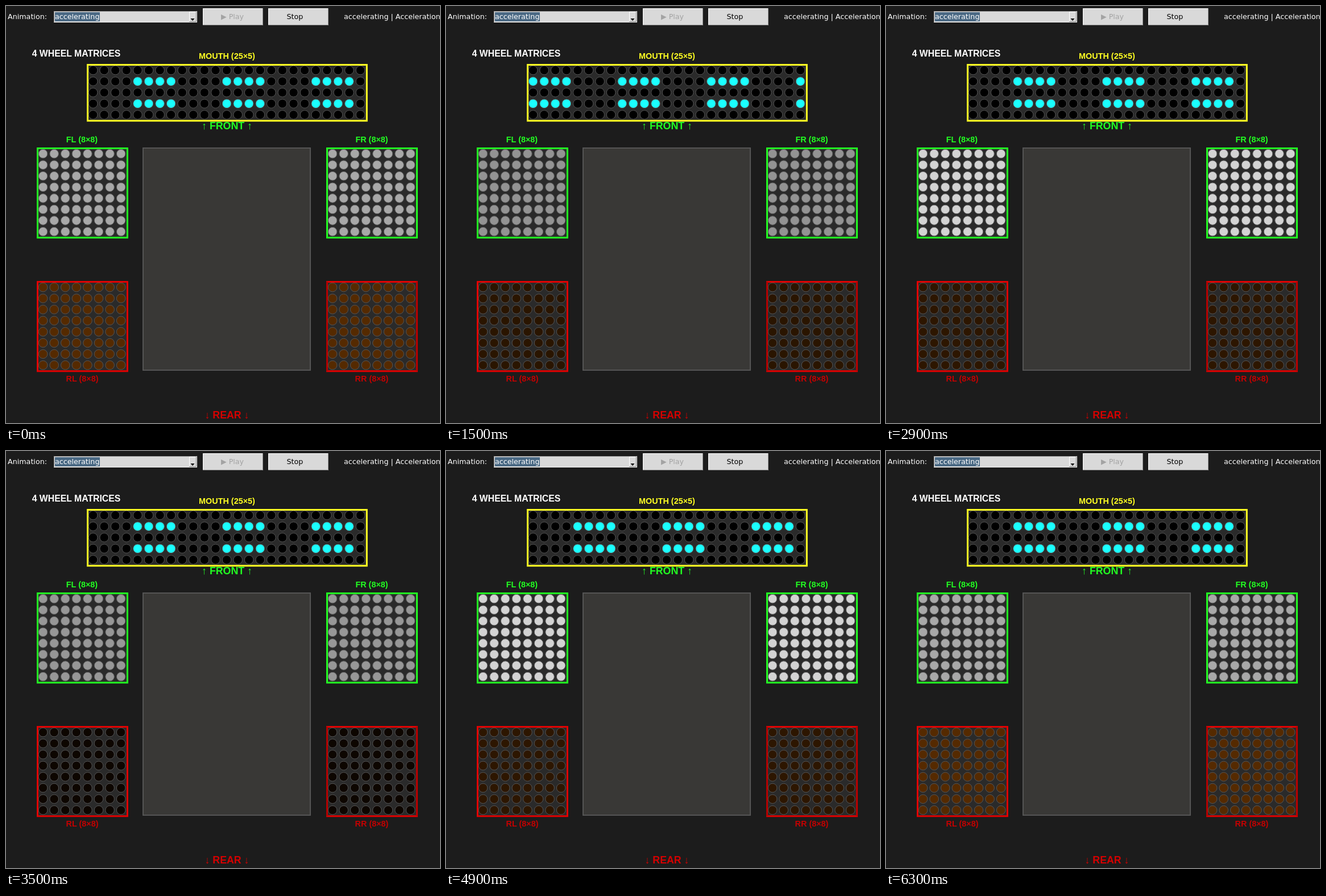
These frames come from a looping animation (763x734 px, 6400 ms). An HTML page:

```html
<!DOCTYPE html>
<html>
<head>
<meta charset="utf-8">
<style>
html, body { margin: 0; width: 100%; height: 100%; overflow: hidden; background: #1c1c1c; }
svg { display: block; }
.ui { font: 12.7px "DejaVu Sans", sans-serif; }
.label { font: bold 14.4px "Liberation Sans", sans-serif; text-anchor: middle; }
.mid { text-anchor: middle; }
</style>
</head>
<body>
<svg id="stage" width="763" height="734" viewBox="0 0 763 734"></svg>
<script>
const stage = document.getElementById('stage');
const LOOP = 6400, PITCH = 19.58;
const GREEN = '#22ff22', RED = '#e20000', DARK_RED = '#c40000';

function add(tag, attrs, text) {
  const node = document.createElementNS('http://www.w3.org/2000/svg', tag);
  for (const key in attrs) node.setAttribute(key, attrs[key]);
  if (text) node.textContent = text;
  stage.append(node);
  return node;
}
const rect = (x, y, width, height, fill, more) => add('rect', { x, y, width, height, fill, ...more });
const path = (d, stroke, more) => add('path', { d, stroke, fill: 'none', ...more });
const ui = (x, y, fill, text, cls = '') => add('text', { x, y, fill, class: 'ui ' + cls }, text);
const label = (x, y, fill, text, style = '') => add('text', { x, y, fill, class: 'label', style }, text);

function matrix(x, y, cols, rows, color) {
  rect(x, y, cols * PITCH + 1.3, rows * PITCH + 0.6, '#2a2a2a', { stroke: color, 'stroke-width': 3 });
  return Array.from({ length: cols * rows }, (_, i) => add('circle', {
    cx: x + 9.6 + (i % cols) * PITCH,
    cy: y + 9.6 + Math.floor(i / cols) * PITCH,
    r: 7.8, fill: '#000', stroke: '#555'
  }));
}

function bevel(x, y, w, h) {
  rect(x, y, w, h, '#d9d9d9');
  path(`M${x + .5} ${y + h}V${y + .5}H${x + w}`, '#fff');
  path(`M${x} ${y + h - .5}H${x + w - .5}V${y}`, '#888');
}

// Toolbar
ui(3, 23, '#fff', 'Animation:');
rect(84, 9, 252, 20, '#d9d9d9');
path('M84.5 29V9.5H336', '#9a9a9a');
path('M84 28.5H335.5V9', '#f4f4f4');
rect(86, 11, 79, 16, '#4a6984');
ui(86, 23, '#fff', 'accelerating');
bevel(322, 10, 13, 18);
add('path', { d: 'M324.5 22H331.5L328 26Z', fill: '#000' });
bevel(346, 4, 106, 30);
ui(398, 23, '#a3a3a3', '▶ Play', 'mid');
bevel(461, 4, 106, 30);
ui(508, 23, '#000', 'Stop', 'mid');
ui(594, 23, '#fff', 'accelerating | Acceleration');

// Vehicle layout
label(123.5, 89, '#fff', '4 WHEEL MATRICES', 'font-size:15.8px');
label(388.5, 93, '#ffff22', 'MOUTH (25×5)');
label(388.5, 217, GREEN, '↑ FRONT ↑', 'font-size:17.8px');
label(388.5, 726, '#d40000', '↓ REAR ↓', 'font-size:17.8px');
label(133.5, 240, GREEN, 'FL (8×8)');
label(643, 240, GREEN, 'FR (8×8)');
label(134, 661, DARK_RED, 'RL (8×8)');
label(643, 661, DARK_RED, 'RR (8×8)');
rect(241, 250, 294, 391, '#393836', { stroke: '#555', 'stroke-width': 2 });

const mouth = matrix(143.5, 103.5, 25, 5, '#ffff22');
const front = [...matrix(55.5, 250.5, 8, 8, GREEN), ...matrix(564.5, 250.5, 8, 8, GREEN)];
const rear = [...matrix(55.5, 485.5, 8, 8, RED), ...matrix(564.5, 485.5, 8, 8, RED)];
path('M564.5 485V643M722.4 485V643', '#b80000', { 'stroke-width': 3 });

// Moments (ms) at which the display advances by one step
const ticks = [100, 350, 550, 700, 950, 1200, 1500, 1800, 2100, 2400, 2700, 2900,
  3100, 3300, 3600, 3900, 4200, 4500, 4700, 4900, 5100, 5400, 5600, 5900];
let shown = -1;

function render(step) {
  const phase = step * Math.PI / 4, c = Math.cos(phase), s = Math.sin(phase);
  const white = Math.round(189.5 - 21.5 * c + 38.6 * s);
  const amber = Math.round(65 + 20 * c + 52 * s);
  front.forEach(led => led.setAttribute('fill', `rgb(${white},${white},${white})`));
  rear.forEach(led => led.setAttribute('fill', `rgb(${amber},${amber >> 1},0)`));
  mouth.forEach((led, i) => {
    const row = Math.floor(i / 25), col = i % 25;
    const lit = row % 2 === 1 && (col + 4 * (step + 1)) % 8 < 4;
    led.setAttribute('fill', lit ? '#1affff' : '#000');
  });
}

function frame(now) {
  const time = now % LOOP;
  const step = ticks.filter(tick => tick <= time).length;
  if (step !== shown) render(shown = step);
  requestAnimationFrame(frame);
}
frame(performance.now());
</script>
</body>
</html>
```
